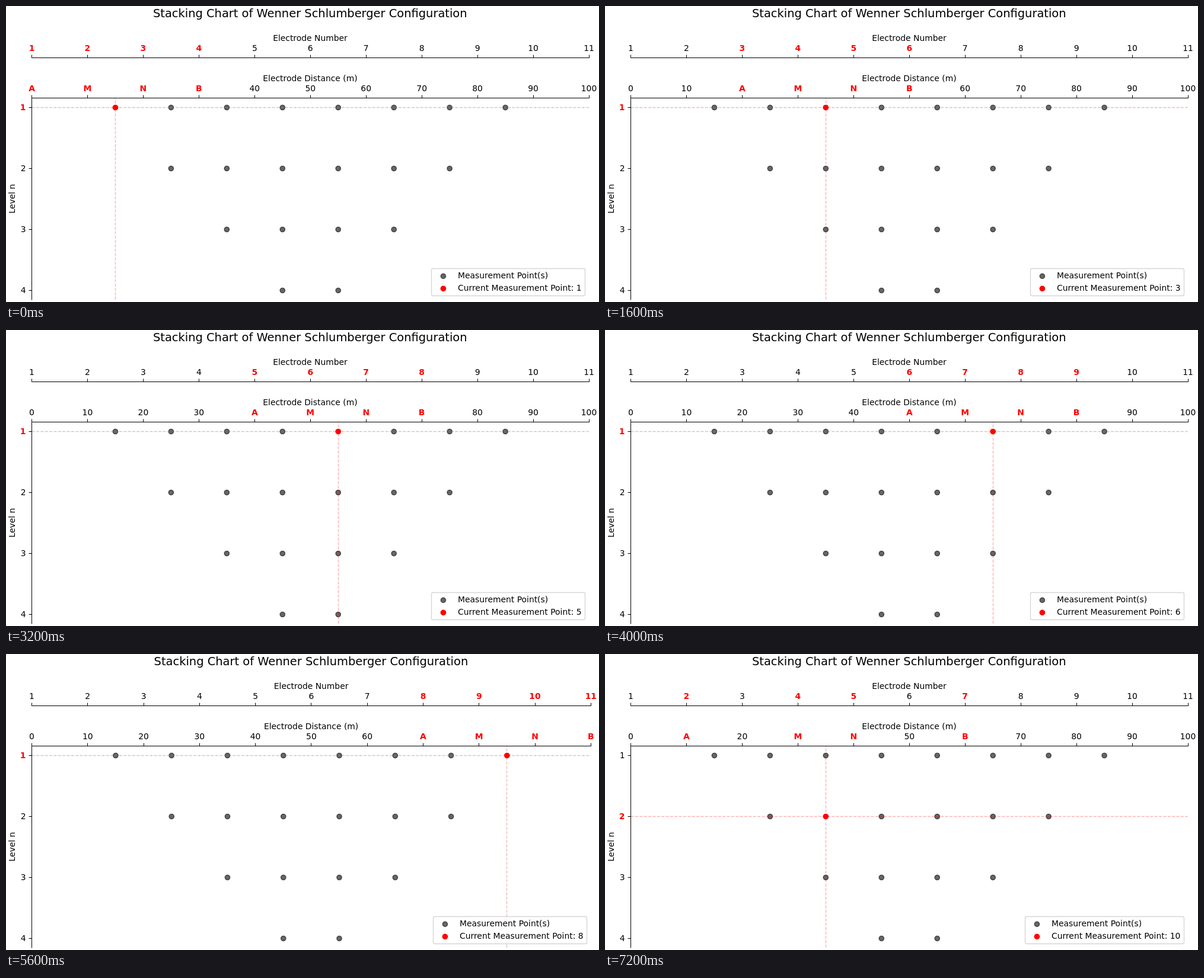
Write an HTML page with a canvas that moves like this. It is 1000 px wide and 500 px high and loops after 8 s.

```html
<!DOCTYPE html>
<html lang="en">
<head>
<meta charset="utf-8">
<title>Stacking chart</title>
<style>
  html, body { margin: 0; width: 100%; height: 100%; overflow: hidden; background: #fff; }
  canvas { display: block; }
</style>
</head>
<body>
<canvas id="stage" width="1000" height="500"></canvas>
<script>
const ctx = document.getElementById('stage').getContext('2d');
const STEP = 800, STEPS = 10;
const LEFT = 43.5, TOP = 155.5, BOTTOM = 496, EM = 13.89;
const GRAY = 'rgba(0,0,0,.6)', RED = '#f00';
const PINK = 'rgba(255,0,0,.3)', DULL = 'rgba(200,90,90,.4)';

// Level n holds 10 - 2n points; the first electrode moves one place per point.
const points = [];
for (let n = 1; n <= 4; n++)
  for (let a = 0; a < 10 - 2 * n; a++) points.push({ n, a, x: a + n + 0.5 });

const levelY = n => 68.5 + 103 * n;
const snap = v => Math.floor(v) + 0.5;

function text(str, x, y, { align = 'center', color = '#000', bold = false, size = EM } = {}) {
  ctx.font = `${bold ? 'bold ' : ''}${size}px "DejaVu Sans", sans-serif`;
  ctx.textAlign = align;
  ctx.fillStyle = color;
  ctx.fillText(str, x, y);
}

function line(x1, y1, x2, y2, color = '#000', width = 1, dash = []) {
  ctx.strokeStyle = color;
  ctx.lineWidth = width;
  ctx.setLineDash(dash);
  ctx.beginPath();
  ctx.moveTo(x1, y1);
  ctx.lineTo(x2, y2);
  ctx.stroke();
  ctx.setLineDash([]);
}

function dot(x, y, color) {
  ctx.beginPath();
  ctx.arc(x, y, 4.17, 0, 2 * Math.PI);
  ctx.fillStyle = ctx.strokeStyle = color;
  ctx.lineWidth = 1.39;
  ctx.fill();
  ctx.stroke();
}

function topAxis(y, right, xOf, title, label, marks) {
  line(LEFT - 0.5, y, snap(right) + 0.5, y);
  text(title, (LEFT + right) / 2 - 0.3, y - 28.5);
  for (let i = 0; i <= 10; i++) {
    const x = xOf(i), active = marks.includes(i);
    line(snap(x), y - 5, snap(x), y);
    text(label(i), x, y - 11.5, active ? { color: RED, bold: true } : {});
  }
}

function legend(right, count) {
  const current = 'Current Measurement Point: ' + count;
  ctx.font = `${EM}px "DejaVu Sans", sans-serif`;
  const x = Math.round(right - 12.5 - ctx.measureText(current).width);
  const box = snap(x - 44.6);
  ctx.beginPath();
  ctx.roundRect(box, 443.5, snap(right - 6.9) - box, 46, 2.8);
  ctx.fillStyle = 'rgba(255,255,255,.8)';
  ctx.fill();
  ctx.strokeStyle = 'rgba(204,204,204,.8)';
  ctx.lineWidth = 1.39;
  ctx.stroke();
  dot(x - 24.6, 456.4, GRAY);
  dot(x - 24.6, 477.4, RED);
  text('Measurement Point(s)', x, 460, { align: 'left' });
  text(current, x, 481, { align: 'left' });
}

function draw(step) {
  const now = points[step], { n, a } = now;
  const marks = [a, a + n, a + n + 1, a + 2 * n + 1];
  // The plot widens a little when the last label becomes a narrower one.
  const right = marks[3] === 10 ? 986.3 : 983;
  const xOf = v => LEFT + (right - LEFT) * v / 10;

  ctx.fillStyle = '#fff';
  ctx.fillRect(0, 0, 1000, 500);
  text('Stacking Chart of Wenner Schlumberger Configuration',
    (LEFT + right) / 2 - 0.5, 19, { size: 19.44 });

  for (const p of points) if (p !== now) dot(xOf(p.x), levelY(p.n), GRAY);

  const dash = [5.14, 2.22], x = xOf(now.x), y = levelY(n);
  line(LEFT, y, right, y, n === 1 ? DULL : PINK, 1.39, dash);
  line(snap(x), BOTTOM, snap(x), TOP, marks[3] === 10 ? DULL : PINK, 1.39, dash);
  dot(x, y, RED);

  topAxis(87.5, right, xOf, 'Electrode Number', i => i + 1, marks);
  topAxis(TOP, right, xOf, 'Electrode Distance (m)',
    i => marks.includes(i) ? 'AMNB'[marks.indexOf(i)] : i * 10, marks);

  line(LEFT, TOP, LEFT, BOTTOM + 0.5);
  for (let i = 1; i <= 4; i++) {
    line(LEFT - 5, levelY(i), LEFT, levelY(i));
    text(i, 33.5, levelY(i) + 4.5,
      { align: 'right', color: i === n ? RED : '#000', bold: i === n });
  }
  ctx.save();
  ctx.translate(15, 325.5);
  ctx.rotate(-Math.PI / 2);
  text('Level n', 0, 0);
  ctx.restore();

  legend(right, step + 1);
}

const start = performance.now();
function tick() {
  draw(Math.floor((performance.now() - start) / STEP) % STEPS);
  requestAnimationFrame(tick);
}
tick();
</script>
</body>
</html>
```
